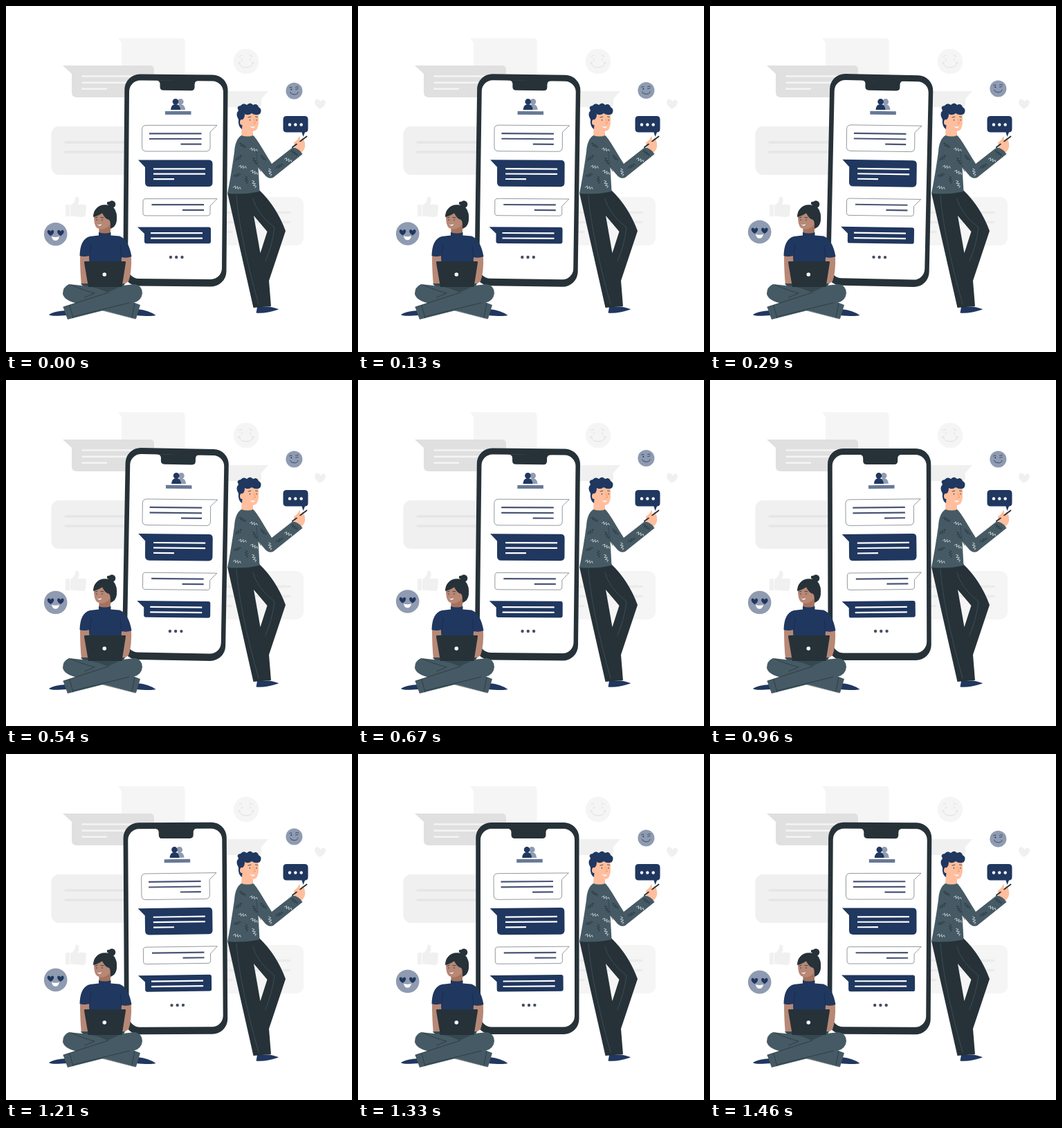
Write an HTML page that moves like this. It is 500x500 px and loops after 1500 ms.

```html
<!DOCTYPE html>
<html lang="en">
<head>
<meta charset="utf-8">
<title>Chat</title>
<style>
html, body { margin: 0; width: 100%; height: 100%; overflow: hidden; background: #fff; }
svg { display: block; width: 100vw; height: 100vh; }
.navy { fill: #20375f; }
.ink { fill: #263238; }
.slate { fill: #455a64; }
.pale { fill: #8f9bb0; }
.fog { fill: #f5f5f5; }
.mist { fill: #f0f0f0; }
.skin { fill: #ffbe9d; }
.tan { fill: #b78876; }
.line { fill: none; stroke-linecap: round; stroke-linejoin: round; }
</style>
</head>
<body>
<svg viewBox="0 0 500 500">
<defs>
  <path id="heart" d="M0 4.6C-7 .5-5.2-4.4-2.4-3.9Q-.5-3.6 0-1.7Q.8-4 2.6-3.9C5.4-3.6 6 1 0 4.6Z"/>
  <path id="zig" class="line" d="M-5.500 1l2.500-2.500 1 4 2.500-4 1 4 2.500-3.500 1.500 2.500"/>
</defs>

<g id="background">
  <path class="fog" d="M162 46.5H253Q258.5 46.5 258.5 52V124H167V53Z"/>
  <path fill="#e0e0e0" d="M82 86H208Q214 86 214 92V126Q214 132 208 132H102Q95 132 95 125V98Z"/>
  <path class="line" stroke="#f5f5f5" stroke-width="2.4" d="M110.5 101.5H203M110.5 110.7H203M110.5 119.8H145"/>
  <rect class="mist" x="65.5" y="174" width="130" height="70" rx="11"/>
  <path class="line" stroke="#e6e6e6" stroke-width="3.6" d="M86 197H190M86 211H190"/>
  <path class="mist" d="M379 123H300V146H364Q369 146 369 141V134Z"/>
  <rect class="fog" x="300" y="276" width="130" height="70" rx="11"/>
  <path class="line" stroke="#ebebeb" stroke-width="3.6" d="M312 298.5H410M312 312.5H410M312 326.5H326"/>
  <circle class="fog" cx="347" cy="80" r="18.3"/>
  <path class="line" stroke="#e0e0e0" d="M337 82Q338 89 347 89T357 82M335.5 82.5L338.5 81.5M355.5 81.5L358.5 82.5M337 73L341 71M352 71L356 73M341 76v2.5M353 76v2.5"/>
  <use href="#heart" class="mist" transform="translate(454 141.5) rotate(5) scale(1.65)"/>
  <path class="mist" d="M86 287.5L92 287V304H86ZM93 288Q100 285 100.5 276Q104 274 105.5 279Q106 283 104 287H113Q116.5 287 116 291L115 302Q114 305.5 110 305L93 303.5Z"/>
</g>

<g id="phone">
  <g transform="rotate(.45 245 252)">
    <rect class="ink" x="170.3" y="99" width="149.2" height="306" rx="22"/>
    <rect x="177" y="108" width="136" height="286.5" rx="16" fill="#fff"/>
    <path class="ink" d="M214 107.5Q221.5 107.5 221.5 113V117Q221.5 122 226.5 122H266.5Q271.5 122 271.5 117V113Q271.5 107.5 279 107.5Z"/>
  </g>
  <g class="pale"><circle cx="252.3" cy="138.3" r="4.3"/><path d="M245 150Q245.5 142 252 142T259 150Z"/></g>
  <g class="navy"><circle cx="245" cy="138.3" r="4.3"/><path d="M238 150Q238.5 142 245 142T252 150Z"/></g>
  <rect x="230" y="152" width="37.5" height="5" fill="#687997"/>
  <g fill="#fff" stroke="#263238" stroke-width=".5">
    <path d="M305 172.4H203Q196.6 172.4 196.6 178.5V204Q196.6 210 203 210H289Q295 210 295 204V182Z"/>
    <path d="M305 278.6H202Q198 278.6 198 282.6V299Q198 303 202 303H291Q295 303 295 299V289Z"/>
  </g>
  <path class="navy" d="M191 222.5H293Q298.5 222.5 298.5 228V255Q298.5 261 292.5 261H207Q201 261 201 255V233Z"/>
  <path class="navy" d="M190 319.5H293Q296 319.5 296 322.5V340Q296 343.2 293 343.2H203Q200 343.2 200 340V329Z"/>
  <g fill="none" stroke-width="2.2">
    <path stroke="#4a5576" d="M207 184.3H282.5M207 192H282.5M252.5 199.6H282.5M210.5 287.2H286M255 294.8H286"/>
    <path stroke="#fff" d="M213 235.3H288M213 242.7H288M213 250.2H243M209 328.2H284M209 335.7H284"/>
  </g>
  <g fill="#455060"><circle cx="238" cy="363" r="2.2"/><circle cx="246.2" cy="363" r="2.2"/><circle cx="254.5" cy="363" r="2.2"/></g>
</g>

<g id="man">
  <path class="navy" d="M363 435L361.5 443.5Q374 445 394 438.5Q389 436 380 434.5Z"/>
  <path class="ink" fill-rule="evenodd" d="M320 270L366 266Q391 290 404 325L380 397L383 434L357.5 436ZM358 303L377.5 326L367.5 357Z"/>
  <path class="line" stroke="#455a64" stroke-width=".7" d="M333 274Q337 330 365 431M357 278Q362 300 388 320Q385 345 375 369"/>
  <path class="skin" d="M341 170H357V187Q350 192 340 188Z"/>
  <path class="skin" d="M341 158Q352 151 364.5 155Q366.500 172 362 179Q356 183 349 179L341 174Z"/>
  <path class="navy" d="M341 178Q335 174 336 164Q331 156 336 151Q332 145 339 144Q343 139 348 143Q353 138 357 143Q363 140 365 146Q371 149 367 156Q361 159 355 155Q350 159 345 156Q345 162 342 164Z"/>
  <ellipse class="skin" cx="341" cy="168" rx="3" ry="4"/>
  <path class="line" stroke="#263238" stroke-width=".8" d="M350 161l4-1M360.5 160l3 .5M352.5 164v1.5M362 164v1.5"/>
  <path class="line" stroke="#eb996e" stroke-width=".8" d="M358 163L360.5 170H357.5"/>
  <path fill="#fff" d="M352 173.5Q356 175.5 360 174Q358 179 352 173.5Z"/>
  <path class="skin" d="M417 206L416 197Q420 196 424 188Q426 190 423.5 196L429 190Q433 197 432 204Q431 209 425 213Z"/>
  <path class="slate" d="M340 187Q350 190 357 187C362 191 368 202 384 228L414 204.5Q423 205 428.5 214L386 248Q379 251 373 243L364.5 233L366.5 268Q345 273 320 271Q325 246 330 211Q331 193 340 187Z"/>
  <path class="line" stroke="#33444c" stroke-width=".8" d="M362 205Q362 222 365 233L368 239"/>
  <g stroke="#263238" stroke-width=".7">
    <use href="#zig" transform="translate(342 201) rotate(30)"/>
    <use href="#zig" transform="translate(336 219) rotate(-40)"/>
    <use href="#zig" transform="translate(360 224) rotate(60)"/>
    <use href="#zig" transform="translate(334 244) rotate(-20)"/>
    <use href="#zig" transform="translate(348 251) rotate(80)"/>
    <use href="#zig" transform="translate(372 219) rotate(40)"/>
    <use href="#zig" transform="translate(395 231) rotate(-30)"/>
    <use href="#zig" transform="translate(417 212) rotate(35)"/>
  </g>
  <g stroke="#e6eaec" stroke-width=".7">
    <use href="#zig" transform="translate(358 207) rotate(12)"/>
    <use href="#zig" transform="translate(342 232) rotate(8)"/>
    <use href="#zig" transform="translate(359 257) rotate(65)"/>
    <use href="#zig" transform="translate(334 262) rotate(10)"/>
    <use href="#zig" transform="translate(359 240) rotate(25)"/>
    <use href="#zig" transform="translate(382 240) rotate(75)"/>
    <use href="#zig" transform="translate(408 222) rotate(20)"/>
  </g>
  <path class="navy" d="M405.5 159H431.5Q436.5 159 436.5 164V177.500Q436.5 182.5 432 182.5L429.5 189L427.5 182.5H405.5Q400.5 182.5 400.5 177.5V164Q400.5 159 405.5 159Z"/>
  <g fill="#fff"><circle cx="410" cy="171.5" r="2.2"/><circle cx="418.3" cy="171.5" r="2.2"/><circle cx="426.7" cy="171.5" r="2.2"/></g>
  <path class="line" stroke="#263238" stroke-width="1.9" d="M414 204L434.5 188.5"/>
  <path class="skin" d="M419 198L424 189Q426 191 424 196L427 197L425 203Z"/>
</g>

<g id="girl">
  <path class="navy" d="M87 440Q69 441 62 446Q64 449 88 447ZM190 438Q207 440 216.5 447Q209 449 188 447Z"/>
  <path class="ink" d="M126 304Q127 291 139 287.5Q150 286 156 292Q161 298 160 310Q159 319 151 322L146 312L136 300Z"/>
  <circle class="ink" cx="153" cy="286.500" r="5.3"/>
  <circle class="ink" cx="148" cy="285" r="2.2"/>
  <path fill="#a5725e" d="M135 314H151V331Q143 336 134 331Z"/>
  <path class="tan" d="M127 304Q136 297 145 301L151 308Q151 318 146 320Q139 325 132 321Q127 318 127 304Z"/>
  <path class="ink" d="M126 305Q128 293 141 290Q154 290 157 304L154 318L149 309Q143 308 139 299Q134 303 126 305Z"/>
  <path class="line" stroke="#263238" stroke-width=".8" d="M129 306l3-.8M137 305.5l4 .3M131 308.5v1.3M139 308.5v1.3"/>
  <path fill="#fff" d="M131.5 315.5Q135 317 138.5 315Q136 320 131.5 315.5Z"/>
  <path class="tan" d="M107 359H121L118 403H109Q107 385 107 359ZM167 361H181Q182 385 177 398L166 405Z"/>
  <path class="navy" d="M134 327Q143 330 151.5 327V331.5L164 332.5Q177 337 181.5 362Q175 365 167 363L166 404H121L120 361Q113 363 106.5 361Q107 337 121 333L134 331.5Z"/>
  <path class="line" stroke="#182b4d" stroke-width=".8" d="M123 344L121 361M165 346L167 363"/>
  <path fill="#37474f" d="M108 401H172L164 414H120Z"/>
  <path class="slate" d="M91 402Q82 406 82 416Q84 425 100 429L188 452L194 432L132 408L119 405Z"/>
  <path class="slate" d="M168 404L186 402Q197 404 197 415Q196 426 184 429L89 453L82.5 435L147 414Z"/>
  <path class="line" stroke="#263238" stroke-width=".7" d="M94 403Q112 411 128 415L114 421M83 435L148 414M92 433L97 451M186 430L182 450M97 449L178 429M140 440L187 452"/>
  <path class="ink" d="M114 369H172Q173.5 369 173 371L167.5 406H119L113 371Q113 369 114 369Z"/>
  <circle cx="142.3" cy="388" r="2.8" fill="#fff"/>
</g>

<g class="floating">
  <circle class="pale" cx="71.7" cy="329.7" r="16.8"/>
  <g class="navy"><use href="#heart" x="64.6" y="327.7"/><use href="#heart" x="79" y="327.7"/></g>
  <path fill="#fff" d="M66 333Q71.5 335 77 333Q76 339 71.5 339T66 333Z"/>
</g>
<g class="floating">
  <circle class="pale" cx="416.4" cy="122.7" r="12"/>
  <path class="line" stroke="#20375f" stroke-width=".8" d="M410.5 124.5Q411.500 128 416.5 128T422 124.500M409.5 118Q411 116.5 413 117.500M418.5 120.5L422 119.5M418.5 117.500Q420.5 116 422.5 117"/>
  <circle class="navy" cx="412.3" cy="120.5" r="1"/>
</g>
</svg>

<script>
const LOOP = 1500;
const phone = document.querySelector("#phone");
const emojis = document.querySelectorAll(".floating");
// Triangle wave from 0 up to 1 and back over one period
const triangle = p => 1 - Math.abs(2 * (p % 1) - 1);

function draw() {
  const p = performance.now() % LOOP / LOOP;
  const tilt = 2 * triangle(p + .25) - 1;
  const lift = 5 * (1 - Math.cos(2 * Math.PI * p));
  phone.setAttribute("transform", `rotate(${tilt} 245 252)`);
  emojis.forEach(e => e.setAttribute("transform", `translate(0 ${-lift})`));
  requestAnimationFrame(draw);
}
draw();
</script>
</body>
</html>
```
